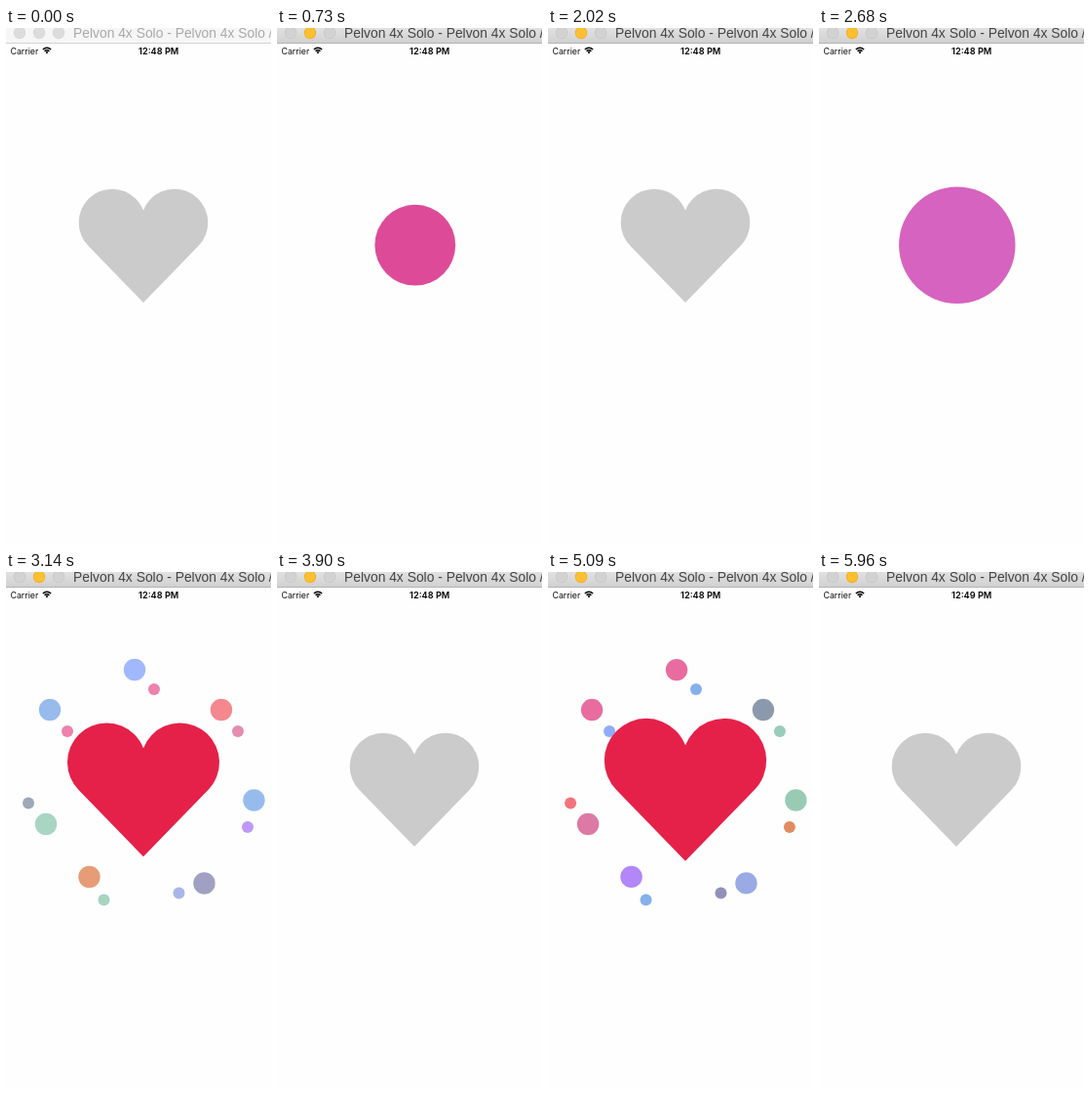
Write an HTML page with a canvas that moves like this. It is 272 by 528 pixels and loops after 6890 ms.

```html
<!DOCTYPE html>
<html lang="en">
<head>
<meta charset="utf-8">
<title>Heart button</title>
<style>
  html, body { margin: 0; width: 100%; height: 100%; overflow: hidden; background: #fefefe; }
  canvas { display: block; width: 272px; height: 528px; }
</style>
</head>
<body>
<canvas id="stage"></canvas>
<script>
const W = 272, H = 528, LOOP = 6890;
const TAU = Math.PI * 2;
const FOCUS_AT = 360, MINUTE_AT = 5300;
const HEART = { x: 141, y: 223 };
const CENTER = { x: 141.8, y: 222.2 };
const RING = 90, RING_GROW = 365, RING_OPEN = 170;
const HEART_START = 400, BURST_END = 950;

const canvas = document.getElementById('stage');
const ctx = canvas.getContext('2d');
const ratio = window.devicePixelRatio || 1;
canvas.width = W * ratio;
canvas.height = H * ratio;

// Resting places: seven large dots, then seven small ones.
const spreadA = [
  [130.5, 98], [219, 140], [244, 233], [205.5, 318.5], [96, 308], [40, 233], [67.5, 160.5],
  [153, 121], [240, 164], [258.5, 261], [175.5, 328.5], [90, 339], [24.5, 261], [40.5, 143]
];
const spreadB = [
  [132, 100], [221, 141], [254.5, 233.5], [203.5, 318.5], [85.5, 312], [41, 258], [45, 141],
  [152, 120], [238, 163], [248, 261], [177.5, 328.5], [100.5, 335.5], [23, 236.5], [63, 163]
];
const earth = ['#d46363', '#9e6b51', '#947cc6', '#c65b94', '#9e6b51', '#b9818b', '#9e6b51',
  '#9e6b51', '#af845b', '#949494', '#637cc6', '#af845b', '#9e6b51', '#a5537c'];
const candy = ['#6f94fa', '#f04b56', '#6399e6', '#7070a5', '#d96b32', '#7dbfa5', '#6399e6',
  '#e34284', '#d3538b', '#9d63f7', '#7c91de', '#7bbc9e', '#6b7c94', '#e34284'];

// on/off: visible switch times; start: time zero of the burst.
const likes = [
  { on: 560, start: 557, off: 2020, spread: spreadA, colors: earth },
  { on: 2440, start: 2463, off: 3900, spread: spreadB, colors: candy },
  { on: 4470, start: 4460, off: 5960, spread: spreadB, colors: candy.slice().reverse() }
];

const clamp = v => Math.max(0, Math.min(1, v));
const span = (t, from, to) => clamp((t - from) / (to - from));
const easeOut = p => 1 - (1 - p) ** 3;

// cubic-bezier(.42, 0, .58, 1)
function easeInOut(p) {
  let lo = 0, hi = 1, u = p;
  for (let i = 0; i < 18; i++) {
    u = (lo + hi) / 2;
    const x = 3 * (1 - u) * (1 - u) * u * 0.42 + 3 * (1 - u) * u * u * 0.58 + u ** 3;
    if (x < p) lo = u; else hi = u;
  }
  return u * u * (3 - 2 * u);
}

function disc(x, y, r, fill) {
  ctx.beginPath();
  ctx.arc(x, y, Math.max(0, r), 0, TAU);
  ctx.fillStyle = fill;
  ctx.fill();
}

function label(text, x, y, font, fill, align = 'left') {
  ctx.font = font;
  ctx.fillStyle = fill;
  ctx.textAlign = align;
  ctx.fillText(text, x, y);
}

function drawTitleBar(active) {
  const fill = ctx.createLinearGradient(0, 0, 0, 15);
  fill.addColorStop(0, active ? '#e2e1e2' : '#f6f6f6');
  fill.addColorStop(1, active ? '#d2d1d2' : '#f6f6f6');
  ctx.fillStyle = fill;
  ctx.fillRect(0, 0, W, 15);
  ctx.fillStyle = active ? '#b4b3b4' : '#d3d3d3';
  ctx.fillRect(0, 15, W, 1);
  for (let i = 0; i < 3; i++) {
    const lit = active && i === 1;
    const x = 14 + i * 20;
    disc(x, 5, 6.2, lit ? '#e9ab2a' : active ? '#c6c5c6' : '#d6d6d6');
    disc(x, 5, 5.5, lit ? '#ffbf2f' : active ? '#d3d2d3' : '#dcdcdc');
  }
  label('Pelvon 4x Solo - Pelvon 4x Solo /', 69, 10,
    '13.85px "Liberation Sans", Arial, sans-serif', active ? '#444' : '#a9a9a9');
}

function drawStatusBar(t) {
  label('Carrier', 4.5, 27, '8.8px Inter, sans-serif', '#111');
  label(t < MINUTE_AT ? '12:48 PM' : '12:49 PM', 156.7, 27,
    '600 9.2px Inter, sans-serif', '#000', 'center');
  ctx.strokeStyle = '#000';
  ctx.lineWidth = 1.4;
  for (const r of [3.5, 5.9]) {
    ctx.beginPath();
    ctx.arc(42, 26.2, r, -Math.PI * 0.75, -Math.PI * 0.25);
    ctx.stroke();
  }
  ctx.beginPath();
  ctx.moveTo(42, 26.4);
  ctx.arc(42, 26.2, 2, -Math.PI * 0.75, -Math.PI * 0.25);
  ctx.fillStyle = '#000';
  ctx.fill();
}

function drawHeart(scale, fill) {
  if (scale <= 0) return;
  const lobe = 32, top = -24, r = 34.3;
  const notch = Math.asin(12.4 / r);
  ctx.save();
  ctx.translate(HEART.x, HEART.y);
  ctx.scale(scale, scale);
  ctx.beginPath();
  ctx.moveTo(0, 58);
  ctx.arc(-lobe, top, r, Math.PI * 0.75, -notch);
  ctx.arc(lobe, top, r, Math.PI + notch, Math.PI * 0.25);
  ctx.closePath();
  ctx.fillStyle = fill;
  ctx.fill();
  ctx.restore();
}

function drawRing(t) {
  const p = easeInOut(clamp(t / RING_GROW));
  const hole = RING * easeOut(span(t, RING_GROW, RING_GROW + RING_OPEN));
  if (hole >= RING) return;
  const mix = (a, b) => Math.round(a + (b - a) * p);
  ctx.beginPath();
  ctx.arc(CENTER.x, CENTER.y, RING * p, 0, TAU);
  if (hole > 0) ctx.arc(CENTER.x, CENTER.y, hole, 0, TAU, true);
  ctx.fillStyle = `rgb(${mix(237, 202)}, ${mix(21, 139)}, ${mix(64, 255)})`;
  ctx.fill();
}

function drawDots(t, like) {
  const out = easeOut(span(t, 340, 680));
  const reach = 0.72 + 0.28 * out + 0.015 * span(t, 700, BURST_END);
  const size = easeOut(span(t, 340, 520));
  ctx.globalAlpha = 1 - span(t, 540, BURST_END);
  like.spread.forEach(([x, y], i) => {
    disc(CENTER.x + (x - CENTER.x) * reach, CENTER.y + (y - CENTER.y) * reach,
      (i < 7 ? 11.2 : 6) * size, like.colors[i]);
  });
  ctx.globalAlpha = 1;
}

// Damped spring that settles exactly at the end of the burst.
function heartScale(t) {
  const x = t - HEART_START, length = BURST_END - HEART_START;
  if (x <= 0) return 0;
  if (x >= length) return 1;
  return 1 - Math.exp(-0.0057 * x) * Math.cos(0.01273 * x) * (1 - (x / length) ** 4);
}

function draw(t) {
  ctx.setTransform(ratio, 0, 0, ratio, 0, 0);
  ctx.fillStyle = '#fefefe';
  ctx.fillRect(0, 0, W, H);
  drawTitleBar(t >= FOCUS_AT);
  drawStatusBar(t);

  const like = likes.find(l => t >= l.on && t < l.off);
  if (!like) {
    drawHeart(1, '#cbcbcb');
    return;
  }
  const age = Math.max(0, t - like.start);
  drawRing(age);
  if (age > 340 && age < BURST_END) drawDots(age, like);
  drawHeart(heartScale(age), '#e5214a');
}

const begin = performance.now();
function tick() {
  draw((performance.now() - begin) % LOOP);
  requestAnimationFrame(tick);
}
tick();
</script>
</body>
</html>
```
